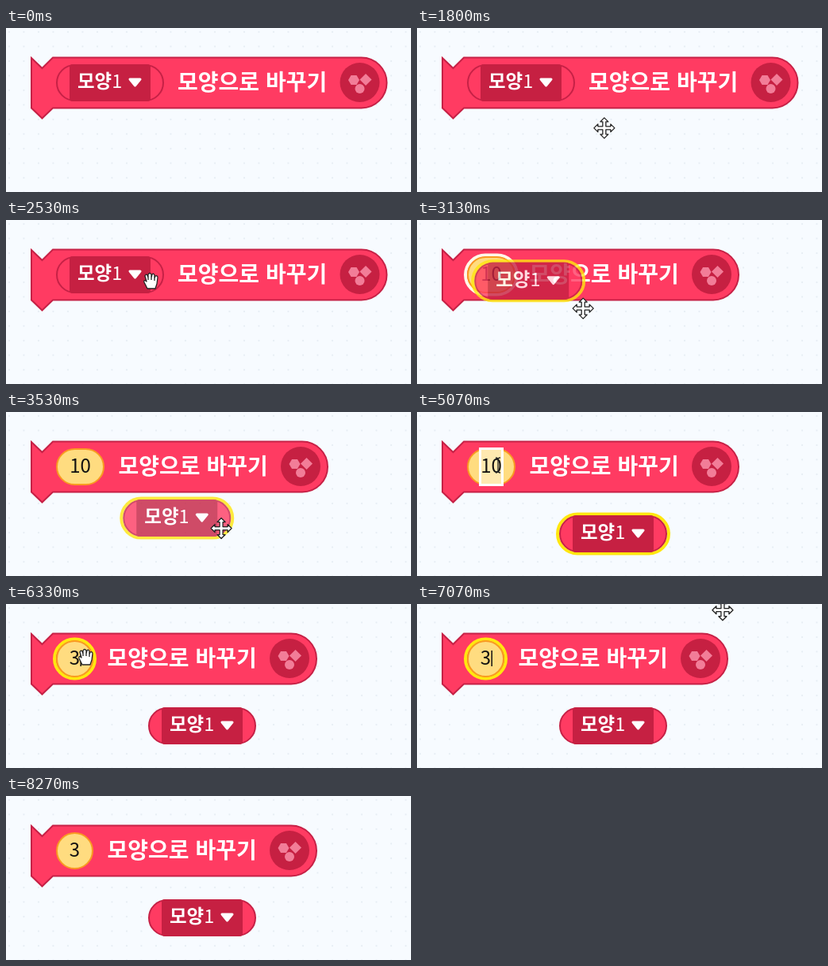
An HTML page for the animation above (8340 ms loop, 510x208 px).

```html
<!DOCTYPE html>
<html lang="ko">
<head>
<meta charset="utf-8">
<style>
html, body { margin: 0; width: 100%; height: 100%; overflow: hidden; background: #f7fbff; }
svg { display: block; width: 510px; height: 208px; }
text { font-family: "Noto Sans CJK KR", "Noto Sans CJK", "Noto Sans CJK JP", sans-serif; font-weight: 700; fill: #fff; }
.digit { font-weight: 400; }
.pink { fill: #ff3b62; stroke: #c62146; stroke-width: 2; }
.dark { fill: #c62042; }
.glow { fill: none; stroke: #ffe70f; stroke-width: 4; }
.cursor { fill: #fff; stroke: #222; stroke-width: 1.3; stroke-linejoin: round; }
</style>
</head>
<body>
<svg viewBox="0 0 510 208">
  <defs>
    <pattern id="dots" width="18.5" height="18.5" patternUnits="userSpaceOnUse">
      <circle cx="4" cy="5" r="1" fill="#e4ebf2"/>
    </pattern>
  </defs>
  <rect width="510" height="208" fill="#f7fbff"/>
  <rect width="510" height="208" fill="url(#dots)"/>

  <path id="block" class="pink"/>
  <g id="label">
    <text x="216" y="78.5" font-size="28">모양으로 바꾸기</text>
    <circle class="dark" cx="445.5" cy="69" r="25"/>
    <g fill="#f27d98">
      <path d="M434.500 60h7l3.500 6-3.500 6h-7l-3.500-6z"/>
      <path d="M453 58l7.500 7.500-7.500 7.500-7.500-7.500z"/>
      <circle cx="445.500" cy="77" r="6"/>
    </g>
  </g>

  <g id="field">
    <rect id="ring" class="glow" x="61" y="44.500" height="50" rx="25"/>
    <rect id="oval" x="64" y="47" height="45" rx="22.500" fill="#ffdc80" stroke="#f99b21" stroke-width="2"/>
    <rect id="box" x="79.500" y="46.500" width="28" height="46" fill="#ffe9b0" stroke="#fff" stroke-width="3"/>
    <text id="value" class="digit" y="77" font-size="24" text-anchor="middle" style="fill:#111"/>
    <path id="caret" stroke="#111" stroke-width="1.500"/>
  </g>

  <g id="piece">
    <rect id="halo" class="glow" x="61" y="44.500" width="140" height="50" rx="25"/>
    <rect class="pink" x="64" y="47" width="134" height="45" rx="22.500"/>
    <rect class="dark" x="80" y="46" width="102" height="47" rx="4"/>
    <text x="90" y="76" font-size="23.500">모양<tspan class="digit">1</tspan></text>
    <path d="M156 65h13l-6.500 8z" fill="#fff" stroke="#fff" stroke-width="3" stroke-linejoin="round"/>
  </g>

  <g id="pointer" class="cursor">
    <path id="move" d="M0-13L5-8H2V-2H8V-5L13 0 8 5V2H2V8H5L0 13-5 8H-2V2H-8V5L-13 0-8-5V-2H-2V-8H-5Z"/>
    <path id="arrow" d="M0 0V18L4 14 7.500 21.500 11 20 7.500 13H13Z"/>
    <path id="hand" d="M-4 10L-8 2Q-9-1-6 0L-5 1-7-6Q-6-9-4-7L-3-4-3-8Q-1-11 1-8L1-4 2-8Q4-10 5-7L5-3 6-6Q9-7 9-4L8 4 6 10ZM-3-4V-1M1-4V-1M5-3V0"/>
    <path id="beam" fill="none" d="M-3-9Q0-9 0-7Q0-9 3-9M0-7V8M-3 10Q0 10 0 8Q0 10 3 10"/>
  </g>
</svg>
<script>
const LOOP = 8340;
const $ = id => document.getElementById(id);
const set = (id, attrs) => { for (const k in attrs) $(id).setAttribute(k, attrs[k]); };
const show = (id, on) => { $(id).style.display = on ? '' : 'none'; };

// keys: [time, x, y]
const pointerKeys = [
  [1270, 490, 222], [1500, 350, 172], [1800, 236, 127], [2070, 196, 88], [2530, 182, 77],
  [2930, 182, 77], [3130, 209, 112], [3400, 256, 140], [3730, 294, 159], [4000, 296, 160],
  [4200, 296, 160], [4270, 298, 162], [4450, 260, 143], [4750, 150, 90], [5000, 102, 67],
  [5800, 102, 67], [6330, 100, 67], [6670, 100, 67], [6930, 270, 38], [7200, 490, -20]
];
const pieceKeys = [
  [2930, 0, 0], [3130, 9, 7.5], [3400, 66, 54], [3730, 112, 82], [4000, 114, 83],
  [4200, 114, 83], [4270, 116, 85]
];

function at(keys, t) {
  if (t <= keys[0][0]) return keys[0].slice(1);
  for (let i = 1; i < keys.length; i++) {
    const [a, ax, ay] = keys[i - 1], [b, bx, by] = keys[i];
    if (t <= b) {
      const u = (t - a) / (b - a);
      return [ax + (bx - ax) * u, ay + (by - ay) * u];
    }
  }
  return keys[keys.length - 1].slice(1);
}

function cursorKind(t, y) {
  if (t >= 3730 && t < 4400) return 'arrow';
  if (t >= 4930 && t < 5800) return 'beam';
  if (t >= 2930 && t < 3730) return 'move';
  return y > 37 && y < 102 ? 'hand' : 'move';
}

function draw(t) {
  const between = (a, b) => t >= a && t < b;
  const value = t < 5800 ? '10' : t < 6000 ? '1' : t < 6200 ? '' : '3';
  const wide = value === '10';
  const right = t < 3000 ? 479.5 : wide ? 405 : 391;
  const width = wide ? 59 : 45;
  const mid = 64 + width / 2;

  set('block', { d: `M32 38L45.500 51 59 37.500H${right - 32}a32 32 0 0 1 0 64H59L45.500 114.500 32 101.500Z` });
  set('label', { transform: `translate(${right - 479.5})` });

  show('field', t >= 3000);
  const near = between(3000, 3400);
  set('ring', { width: width + 6, style: near ? 'stroke:#fff8e8' : '' });
  show('ring', near || between(5270, 7400));
  set('oval', { width });
  show('box', between(5000, 5330));
  $('value').textContent = value;
  set('value', { x: mid });
  set('caret', { d: `M${mid + value.length * 6.7 + 1} 59V79` });
  show('caret', between(5330, 7400));

  const [dx, dy] = at(pieceKeys, t);
  set('piece', { transform: `translate(${dx} ${dy})`, opacity: between(2930, 4270) ? 0.8 : 1 });
  show('halo', between(2930, 5200));

  const [x, y] = at(pointerKeys, t);
  const kind = cursorKind(t, y);
  show('pointer', between(1270, 7200));
  set('pointer', { transform: `translate(${x} ${y})` });
  for (const k of ['move', 'arrow', 'hand', 'beam']) show(k, k === kind);
}

const start = performance.now();
function tick() {
  draw((performance.now() - start) % LOOP);
  requestAnimationFrame(tick);
}
tick();
</script>
</body>
</html>
```
